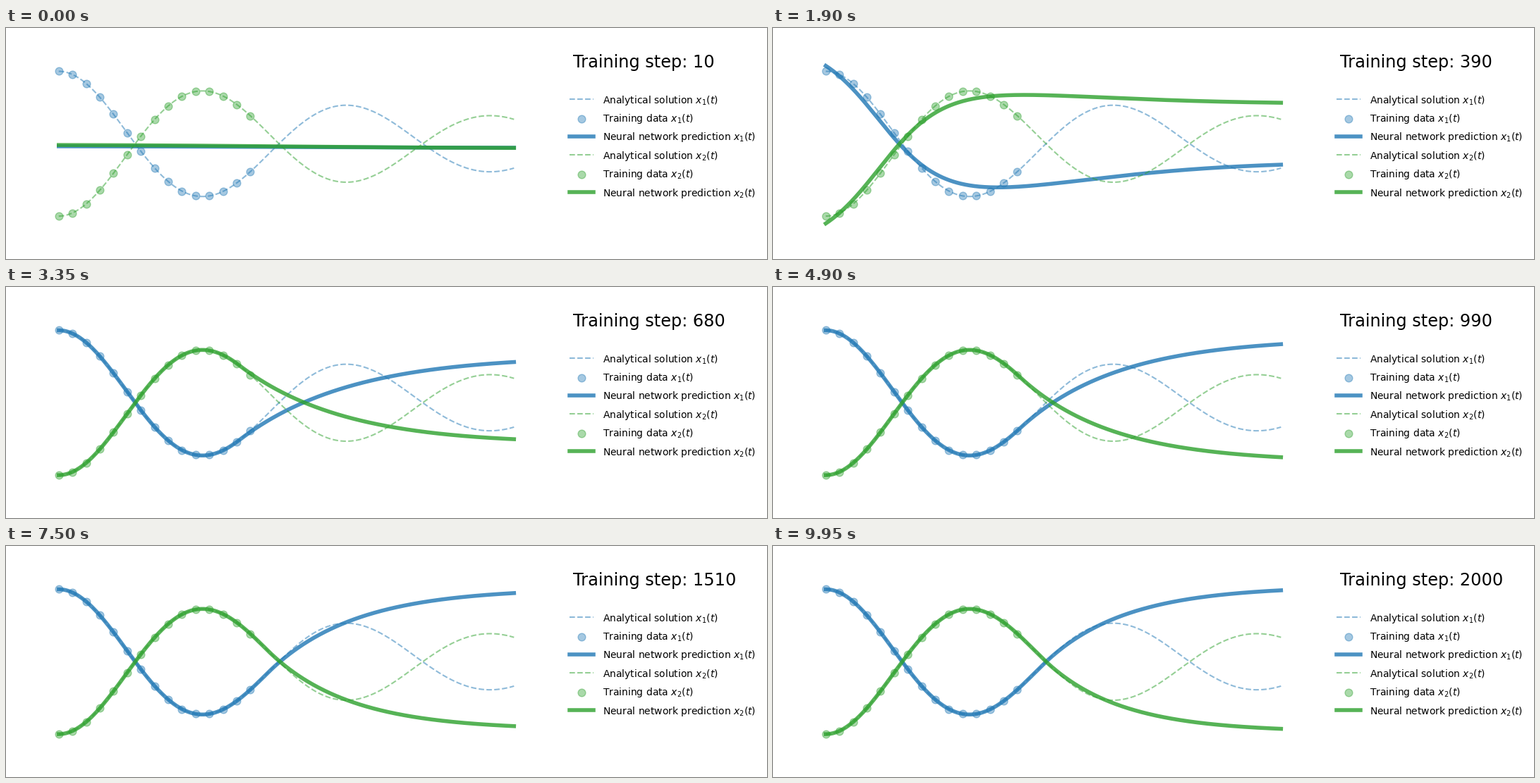
A matplotlib script that plays this animation: 1079x328 px, repeating every 10000 ms.

```python
import matplotlib.pyplot as plt
import numpy as np
from matplotlib.animation import FuncAnimation

W, H, DPI = 1079, 328, 100
FRAMES, INTERVAL = 200, 50
X0, SPAN, MID, AMP = 74.8, 645.5, 164.3, 102.8
BLUE, GREEN = "tab:blue", "tab:green"
OMEGA = np.sqrt(99)
FLAT, STEEP, BENT = 10, 220, 390    # training steps of the early shapes
plt.rcParams["font.family"] = "DejaVu Sans"

t = np.linspace(0, 1, 500)
t_data = t[:225:15]


def oscillator(s):
    """Underdamped oscillator, damping 1, natural frequency 10."""
    return np.exp(-s) * (np.cos(OMEGA * s) + np.sin(OMEGA * s) / OMEGA)


def velocity(s):
    return -100 / OMEGA * np.exp(-s) * np.sin(OMEGA * s)


def to_x(s):
    return X0 + SPAN * s


def to_y(value, sign):
    return MID - sign * AMP * value


def smooth(a, b, step):
    u = np.clip((step - a) / (b - a), 0, 1)
    return u * u * (3 - 2 * u)


def bend(level, drop, drift, centre=0.1165, width=0.139):
    """A sharp tanh step plus a broad one that drifts back."""
    return (level + drop * np.tanh((t - centre) / width)
            - drift * np.tanh((t - 0.504) / 0.387))


def settled(step, sign, limit):
    """Follows the data up to a join, then relaxes with the same slope."""
    age = 680 - step
    join = 0.496 - 0.1 * np.exp(age / 900)
    end = limit - 0.36 * np.exp(age / 370)
    gap = end - oscillator(join)
    tail = end - gap * np.exp(-velocity(join) / gap * (t - join))
    return to_y(np.where(t < join, oscillator(t), tail), sign)


def predict(step, sign, limit, flat, steep, bent):
    if step <= STEEP:
        return flat + smooth(FLAT, STEEP, step) * (steep - flat)
    if step <= BENT:
        return steep + smooth(STEEP, BENT, step) * (bent - steep)
    # The start of the curve is learned sooner than the far end
    mix = 1 - np.exp((BENT - step) / (30 + 50 * t))
    return bent + mix * (settled(step, sign, limit) - bent)


fig = plt.figure(figsize=((W + 1e-6) / DPI, (H + 1e-6) / DPI), dpi=DPI,
                 facecolor="white")
ax = fig.add_axes([0, 0, 1, 1])
ax.set_xlim(0, W)
ax.set_ylim(H, 0)
ax.axis("off")


def dashed(x, y, color):
    ax.plot(x, y, "--", color=color, lw=1.5, alpha=0.5)


def dots(x, y, color):
    ax.scatter(x, y, s=60, color=color, alpha=0.4)


def thick(x, y, color):
    return ax.plot(x, y, color=color, lw=4, alpha=0.8)[0]


def add_series(color, sign, *shape):
    dashed(to_x(t), to_y(oscillator(t), sign), color)
    dots(to_x(t_data), to_y(oscillator(t_data), sign), color)
    line = thick(to_x(t), predict(FLAT, sign, *shape), color)
    return line, sign, shape


series = [
    add_series(BLUE, 1, 1.053, bend(169, 0, -1.2),
               bend(95, 140, 0, 0.101, 0.155), bend(105.5, 116, 32)),
    add_series(GREEN, -1, 0.98, bend(168.2, 0, -2.4),
               bend(233.6, -140, 0, 0.101, 0.155), bend(210, -115, -13)),
]

# Legend
labels = ["Analytical solution", "Training data", "Neural network prediction"]
for row in range(6):
    color, var = (BLUE, 1) if row < 3 else (GREEN, 2)
    y = 101.2 + 26.4 * row
    kind = row % 3
    if kind == 1:
        dots([816.2], [y + 1.2], color)
    else:
        (dashed if kind == 0 else thick)([799, 833], [y, y], color)
    ax.text(846, y + 5.3, f"{labels[kind]} $x_{var}(t)$", fontsize=10,
            va="baseline")

title = ax.text(804, 56, "", fontsize=17.28, va="baseline")


def update(frame):
    step = 10 * (frame + 1)
    title.set_text(f"Training step: {step}")
    for line, sign, shape in series:
        line.set_ydata(predict(step, sign, *shape))
    return [title] + [line for line, *_ in series]


anim = FuncAnimation(fig, update, frames=FRAMES, interval=INTERVAL,
                     repeat=True, repeat_delay=0)
plt.show()
```
